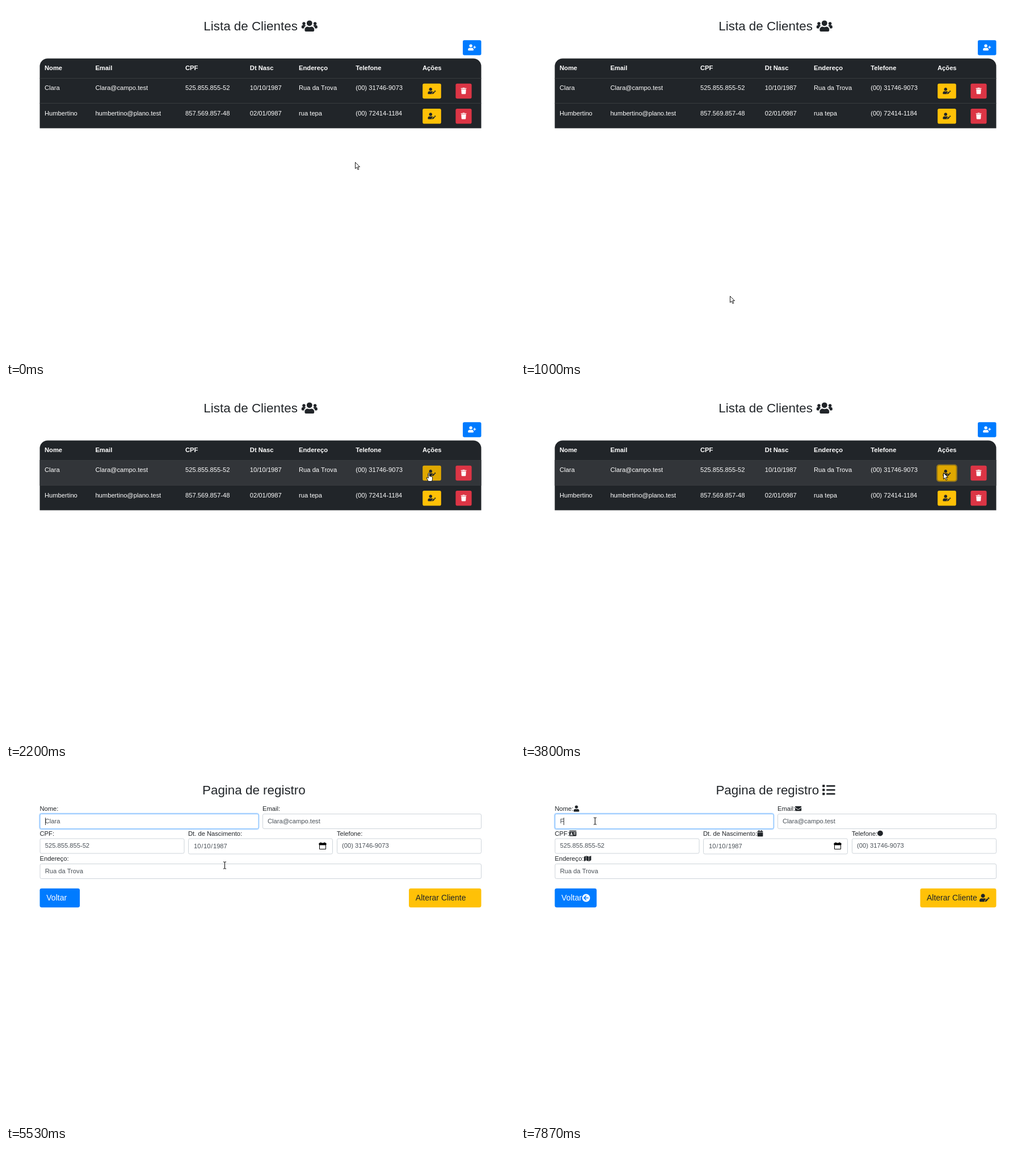
These frames come from a looping animation (897 px wide and 624 px high, 8000 ms). An HTML page:

```html
<!DOCTYPE html>
<html lang="pt">
<head>
<meta charset="utf-8">
<style>
html, body { margin: 0; width: 100%; height: 100%; overflow: hidden; background: #fff; }
svg { display: block; font: 11.2px "Liberation Sans", Arial, sans-serif; fill: #212529; }
.title { font-size: 22.4px; }
.big { font-size: 14px; }
.bold { font-weight: bold; }
.white { fill: #fff; }
.field { fill: #495057; }
</style>
</head>
<body>
<svg id="stage" width="897" height="624" viewBox="0 0 897 624"></svg>
<script>
const head = 'M224 256a128 128 0 1 0-.1 0z';
const icons = {
  user: head + 'M314 288h-17q-73 32-146 0h-17C60 288 0 348 0 422v42a48 48 0 0 0 48 48h352a48 48 0 0 0 48-48v-42c0-74-60-134-134-134z',
  edit: head + 'M314 288h-17q-73 32-146 0h-17C60 288 0 348 0 422v42a48 48 0 0 0 48 48h275q-4-10-3-21l8-72 86-86q-40-45-100-45z' +
    'M359 433l-7 61q0 19 18 18l61-7 138-138-72-72zM633 269l-38-38q-17-14-34 0l-42 42 72 72 42-42q14-17 0-34z',
  users: 'M96 224a64 64 0 1 0-.1 0zM544 224a64 64 0 1 0-.1 0zM320 256a112 112 0 1 0-.1 0z' +
    'M397 288h-8q-69 32-138 0h-8c-63 0-115 52-115 115v29a48 48 0 0 0 48 48h288a48 48 0 0 0 48-48v-29c0-63-52-115-115-115z' +
    'M173 242Q154 224 128 224H64a64 64 0 0 0-64 64v32a32 32 0 0 0 32 32h66q14-67 75-110z' +
    'M467 242q19-18 45-18h64a64 64 0 0 1 64 64v32a32 32 0 0 1-32 32h-66q-14-67-75-110z',
  trash: 'M432 32H312L303 13Q295 0 281 0H167q-14 0-22 13L136 32H16Q0 32 0 48v32q0 16 16 16h416q16 0 16-16V48q0-16-16-16zM53 467a48 48 0 0 0 48 45h246a48 48 0 0 0 48-45l21-339H32z',
  list: [48, 208, 368].map(y => `M10 ${y}h76l10 10v76l-10 10H10L0 ${y + 86}v-76zM170 ${y + 16}h332l10 10v44l-10 10H170l-10-10v-44z`).join(''),
  mail: 'M0 190v210a48 48 0 0 0 48 48h416a48 48 0 0 0 48-48V190L320 328q-64 44-128 0zM48 64h416a48 48 0 0 1 48 48v28L300 290q-44 30-88 0L0 140v-28a48 48 0 0 1 48-48z',
  card: 'M48 32h480a48 48 0 0 1 48 48v16H0V80a48 48 0 0 1 48-48zM0 128h576v304a48 48 0 0 1-48 48H48a48 48 0 0 1-48-48z' +
    'M352 192h160v32H352zm0 64h160v32H352zm0 64h160v32H352zM176 192a64 64 0 1 0 .1 0zM64 410h224q0-74-72-74h-80q-72 0-72 74z',
  date: 'M0 192h448v272a48 48 0 0 1-48 48H48a48 48 0 0 1-48-48zM0 160v-48a48 48 0 0 1 48-48h48V0h64v64h128V0h64v64h48a48 48 0 0 1 48 48v48z',
  map: 'M0 118l160-86v384L0 480zM192 32l192 64v384l-192-64zM416 96l160-64v362l-160 86z'
};
icons.plus = icons.user + 'M624 208h-64v-64q0-16-16-16h-32q-16 0-16 16v64h-64q-16 0-16 16v32q0 16 16 16h64v64q0 16 16 16h32q16 0 16-16v-64h64q16 0 16-16v-32q0-16-16-16z';

const icon = (name, x, y, size = 11.2, fill = '#212529') =>
  `<path transform="translate(${x} ${y}) scale(${size / 512})" fill="${fill}" fill-rule="evenodd" d="${icons[name]}"/>`;
const text = (str, x, y, cls = '') => `<text x="${x}" y="${y}" class="${cls}">${str}</text>`;
const rect = (x, y, w, h, fill, extra = '') =>
  `<rect x="${x}" y="${y}" width="${w}" height="${h}" fill="${fill}" ${extra}/>`;
const button = (x, y, w, h, fill, r = 2.8, extra = '') => rect(x, y, w, h, fill, `rx="${r}" ${extra}`);
const input = (x, y, w, h = 26) => rect(x, y, w, h, '#fff', 'rx="2.5" stroke="#ced4da"');
const group = (id, body) => `<g id="${id}">${body}</g>`;

const person = { name: 'Clara', mail: 'Clara@campo.test', cpf: '525.855.855-52', street: 'Rua da Trova', phone: '(00) 31746-9073' };
const columns = [68, 157.4, 316, 429.8, 516, 616.2, 734];
const cells = (list, y, cls) => list.map((s, i) => text(s, columns[i], y, cls)).join('');
const rowTop = [127.3, 171.4];
const actions = (y, i) =>
  button(734.2, y, 32.6, 26.6, '#ffc107', 2.8, `id="edit${i}"`) + icon('edit', 743.4, y + 7.3) +
  button(792.4, y, 28.2, 26.6, '#dc3545') + icon('trash', 801.6, y + 7.3, 11.2, '#fff');

const listPage =
  text('Lista de Clientes', 348.3, 43, 'title') + icon('users', 520.8, 24, 22.4) +
  button(805, 60.2, 32.5, 26.6, '#007bff') + icon('plus', 814.2, 67.4, 11.2, '#fff') +
  '<path d="M59.5 215.5V106.5a14 14 0 0 1 14-14h750a14 14 0 0 1 14 14v109z"/>' +
  rowTop.map((y, i) => rect(59.5, y, 778, 44.1, '#323539', `id="row${i}"`)).join('') +
  rect(59.5, 127, 778, 1, '#373b3e') + rect(59.5, 171, 778, 1, '#373b3e') +
  cells(['Nome', 'Email', 'CPF', 'Dt Nasc', 'Endereço', 'Telefone', 'Ações'], 113.4, 'bold white') +
  cells([person.name, person.mail, person.cpf, '10/10/1987', person.street, person.phone], 148.4, 'white') +
  cells(['Humbertino', 'humbertino@plano.test', '857.569.857-48', '02/01/0987', 'rua tepa', '(00) 72414-1184'], 192.5, 'white') +
  group('ring', button(732, 134.5, 37, 31, 'rgba(222,170,12,.5)', 5)) +
  actions(136.7, 0) + actions(180.9, 1);

const loadedIcons =
  icon('list', 531.2, 24, 22.4) + icon('user', 92.8, 62.4) + icon('mail', 483, 62.4) +
  icon('card', 85, 106) + icon('date', 416.6, 106) + '<circle cx="633" cy="111.6" r="4.9"/>' + icon('map', 111, 150.5) +
  '<circle cx="114.7" cy="225.5" r="6.9" fill="#fff"/>' +
  '<path d="M115 221.5l-4 4 4 4M111 225.5h8" fill="none" stroke="#007bff" stroke-width="1.7"/>' +
  icon('edit', 808, 218.3, 14);

const formPage =
  text('Pagina de registro', 346, 43, 'title" id="heading') +
  text('Nome:', 59.5, 72) + text('Email:', 452, 72) + text('CPF:', 59.5, 115.8) +
  text('Dt. de Nascimento:', 321, 115.8) + text('Telefone:', 583, 115.8) + text('Endereço:', 59.5, 160.2) +
  rect(58, 75.5, 388.5, 30, '#bfdeff', 'rx="4.5"') +
  rect(60, 77.5, 385, 26, '#fff', 'rx="2.5" stroke="#80bdff"') +
  input(452.5, 77.5, 385) + input(60, 121, 254) + input(321.5, 121, 254, 27) + input(583.5, 121, 254) + input(60, 165.5, 777.5) +
  rect(69, 82.5, 27, 16, '#3297fd', 'id="selection"') +
  text(person.name, 68.7, 94, 'field" id="name') +
  rect(69, 84, 1, 13, '#333', 'id="caret"') +
  text(person.mail, 461, 94, 'field') + text(person.cpf, 68.7, 137.3, 'field') +
  '<text x="331" y="138" class="field">10<tspan dx=".7">/</tspan><tspan dx=".7">10</tspan><tspan dx=".7">/</tspan><tspan dx=".7">1987</tspan></text>' +
  '<path d="M552.5 129.5h11v10h-11zM552 129h12v3h-12zM554 128h1.5v2H554zM560.5 128h1.5v2h-1.5z" fill="none" stroke="#000"/>' +
  rect(552, 129, 12, 3, '#000') +
  text(person.phone, 592, 137.3, 'field') + text(person.street, 68.7, 182, 'field') +
  button(59.5, 208.8, 70.6, 33.4, '#007bff', 3.4, 'id="back"') + text('Voltar', 71.3, 230.4, 'big white') +
  group('save', button(710, 208.8, 127.5, 33.4, '#ffc107', 3.4, 'id="saveBox"') + text('Alterar Cliente', 721.8, 230.4, 'big" id="saveText')) +
  group('loaded', loadedIcons);

const pointers =
  '<path id="arrow" d="M.5.5v11.2l2.6-2.4 2 4.2 1.8-.8-2-4.1h3.6z" fill="#fff" stroke="#000" stroke-width=".9"/>' +
  '<path id="hand" d="M.2 1.6c0-1.4 2.1-1.4 2.1 0v4.7l4.2 1q1.1.4 1.1 1.6v3l-1.2 3.7H.4L-2.7 10q-.6-1.9 1.2-1.4L.2 10z" fill="#fff" stroke="#000" stroke-width=".9"/>' +
  '<path id="beam" d="M-2.5-6h2L0-5.5.5-6h2M0-5.5v11M-2.5 6h2L0 5.5.5 6h2" fill="none" stroke="#fff" style="mix-blend-mode:difference"/>';

document.getElementById('stage').innerHTML =
  rect(0, 0, 897, 624, '#fff') + group('listPage', listPage) + group('formPage', formPage) + pointers;

const $ = id => document.getElementById(id);
const show = (id, on) => $(id).style.display = on ? '' : 'none';

// Pointer path: [tick, x, y], one tick = 1/15 s
const path = [
  [0, 615, 274.5], [3, 640, 200], [5, 600, 188], [8, 520, 340], [11, 440, 520], [13, 395, 558],
  [15, 368, 511], [16, 346, 480], [17, 365, 455], [18, 405, 444], [19, 431, 442],
  [24, 431, 442], [28, 560, 330], [30, 690, 215], [31, 728, 170], [32, 741, 154], [33, 744, 149],
  [66, 744, 149], [68, 757, 152], [69, 745, 150], [71, 681, 149],
  [79, 681, 149], [81, 385, 168], [84, 385, 168], [89, 132, 90], [91, 132, 90], [92, 130, 90], [120, 130, 90]
];

function pointerAt(tick) {
  const i = path.findIndex(p => p[0] > tick);
  const [a, x, y] = path[i - 1], [b, x2, y2] = path[i];
  const k = (tick - a) / (b - a);
  return [x + (x2 - x) * k, y + (y2 - y) * k];
}

function draw(t) {
  const tick = Math.min(119, Math.floor((t + 4) * 15 / 1000));
  const [x, y] = pointerAt(tick);
  const form = t >= 5530, loaded = t >= 5670, stuck = tick >= 32;

  show('listPage', !form);
  show('formPage', form);
  show('row0', stuck || (y >= rowTop[0] && y < rowTop[1]));
  show('row1', !stuck && y >= rowTop[1] && y < 215.5);
  $('edit0').setAttribute('fill', stuck ? '#e0a800' : '#ffc107');
  $('edit0').setAttribute('stroke', t >= 3400 ? '#c69500' : 'none');
  $('ring').style.opacity = Math.max(0, Math.min(1, (t - 3333) / 200));

  show('loaded', loaded);
  $('heading').setAttribute('x', loaded ? 343.4 : 346);
  $('back').setAttribute('width', loaded ? 73.8 : 70.6);
  $('saveBox').setAttribute('x', loaded ? 703.5 : 710);
  $('saveBox').setAttribute('width', loaded ? 134 : 127.5);
  $('saveText').setAttribute('x', loaded ? 715 : 721.8);

  const selected = t >= 6400 && t < 7870, typed = t >= 7870;
  show('selection', selected);
  $('name').textContent = typed ? 'F' : person.name;
  $('name').style.fill = selected ? '#fff' : '';
  show('caret', !selected && (t < 5930 || t >= 6270));
  $('caret').setAttribute('x', typed ? 75 : t >= 6270 ? 96 : 69);

  const shape = tick >= 70 ? 'beam' : tick >= 32 && t < 3800 ? 'hand' : 'arrow';
  for (const id of ['arrow', 'hand', 'beam']) show(id, id === shape);
  $(shape).setAttribute('transform', `translate(${Math.round(x) + (shape === 'beam' ? .5 : 0)} ${Math.round(y)})`);
}

const start = performance.now();
function loop() {
  draw((performance.now() - start) % 8000);
  requestAnimationFrame(loop);
}
loop();
</script>
</body>
</html>
```
